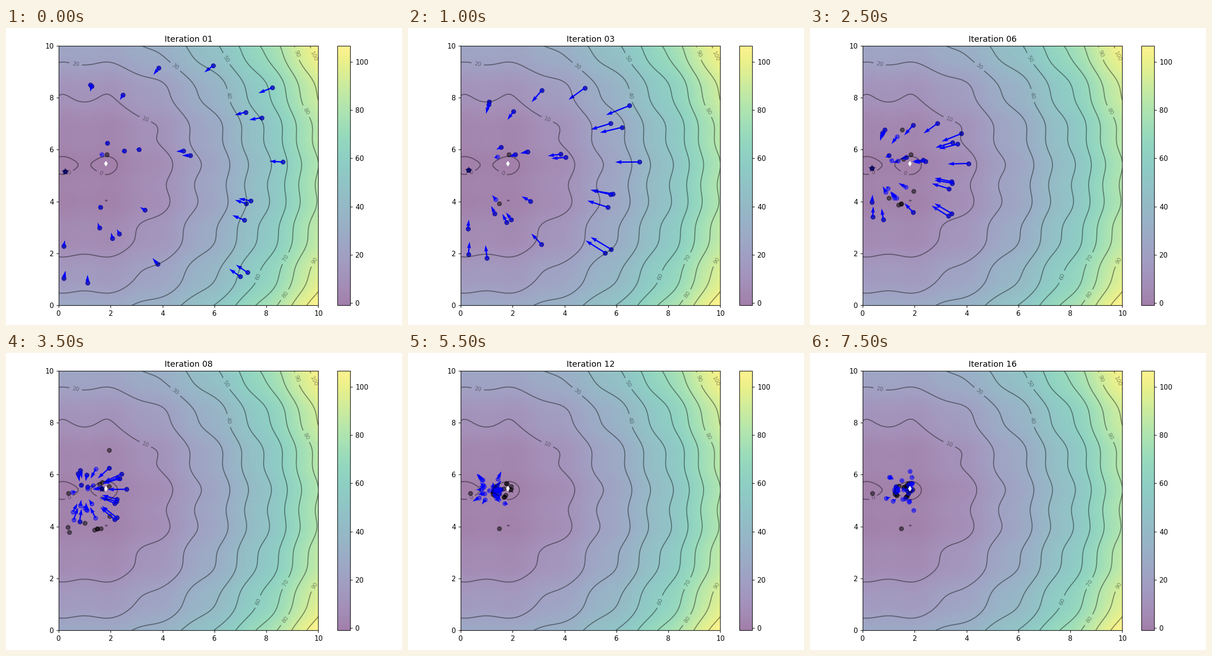
Recreate the animation shown at these times as a matplotlib script. Size 864x648 px, loop 8000 ms.

```python
import numpy as np
import matplotlib.pyplot as plt
from matplotlib.animation import FuncAnimation

FRAMES, INTERVAL = 16, 500
SIZE, DPI = (8, 6), 108
LABEL_DPI, LAYOUT_DPI = 100, 120
N, W, C1, C2 = 30, 0.8, 0.1, 0.1


def f(x, y):
    return (x - 1)**2 + (y - 5)**2 + np.sin(3*x - 1.41) + np.sin(4*y + 1.73)


def simulate(steps):
    """Particle swarm run: list of (X, V, pbest, gbest) after each update."""
    rng = np.random.RandomState(100)
    X = rng.rand(2, N) * 10
    V = rng.rand(2, N) * 0.1
    pbest, pbest_obj = X.copy(), f(*X)
    gbest = pbest[:, pbest_obj.argmin()].copy()
    states = []
    for _ in range(steps):
        r1, r2 = rng.rand(2)
        V = W*V + C1*r1*(pbest - X) + C2*r2*(gbest.reshape(-1, 1) - X)
        X = X + V
        obj = f(*X)
        better = pbest_obj >= obj
        pbest[:, better] = X[:, better]
        pbest_obj = np.minimum(pbest_obj, obj)
        gbest = pbest[:, pbest_obj.argmin()].copy()
        states.append((X, V, pbest.copy(), gbest))
    return states


# The first picture shows the swarm after two updates
states = simulate(FRAMES + 1)[1:]

x, y = np.meshgrid(np.linspace(0, 10, 100), np.linspace(0, 10, 100))
z = f(x, y)
low = z.argmin()

fig, ax = plt.subplots(figsize=SIZE, dpi=DPI)
fig.set_dpi(LABEL_DPI)  # contour labels are placed by pixel widths
img = ax.imshow(z, extent=[0, 10, 0, 10], origin="lower", cmap="viridis", alpha=0.5)
fig.colorbar(img, ax=ax)
ax.plot([x.ravel()[low]], [y.ravel()[low]], marker="d", markersize=5, color="white")
contours = ax.contour(x, y, z, 10, colors="black", alpha=0.4)
ax.clabel(contours, inline=True, fontsize=8, fmt="%.0f")

X, V, pbest, gbest = states[0]
pbest_dots = ax.scatter(*pbest, marker="o", color="black", alpha=0.5)
dots = ax.scatter(*X, marker="o", color="blue", alpha=0.5)
arrows = ax.quiver(*X, *V, color="blue", width=0.005, angles="xy",
                   scale_units="xy", scale=1)
star = ax.scatter([gbest[0]], [gbest[1]], marker="*", s=100, color="black", alpha=0.4)
ax.set_xlim(0, 10)
ax.set_ylim(0, 10)


def animate(i):
    X, V, pbest, gbest = states[i]
    ax.set_title(f"Iteration {i + 1:02d}")
    pbest_dots.set_offsets(pbest.T)
    dots.set_offsets(X.T)
    arrows.set_offsets(X.T)
    arrows.set_UVC(*V)
    star.set_offsets(gbest.reshape(1, -1))
    return pbest_dots, dots, arrows, star


animate(0)
fig.set_dpi(LAYOUT_DPI)
fig.tight_layout()
fig.set_dpi(DPI)

anim = FuncAnimation(fig, animate, frames=FRAMES, interval=INTERVAL,
                     blit=False, repeat=True, repeat_delay=0)
plt.show()
```
